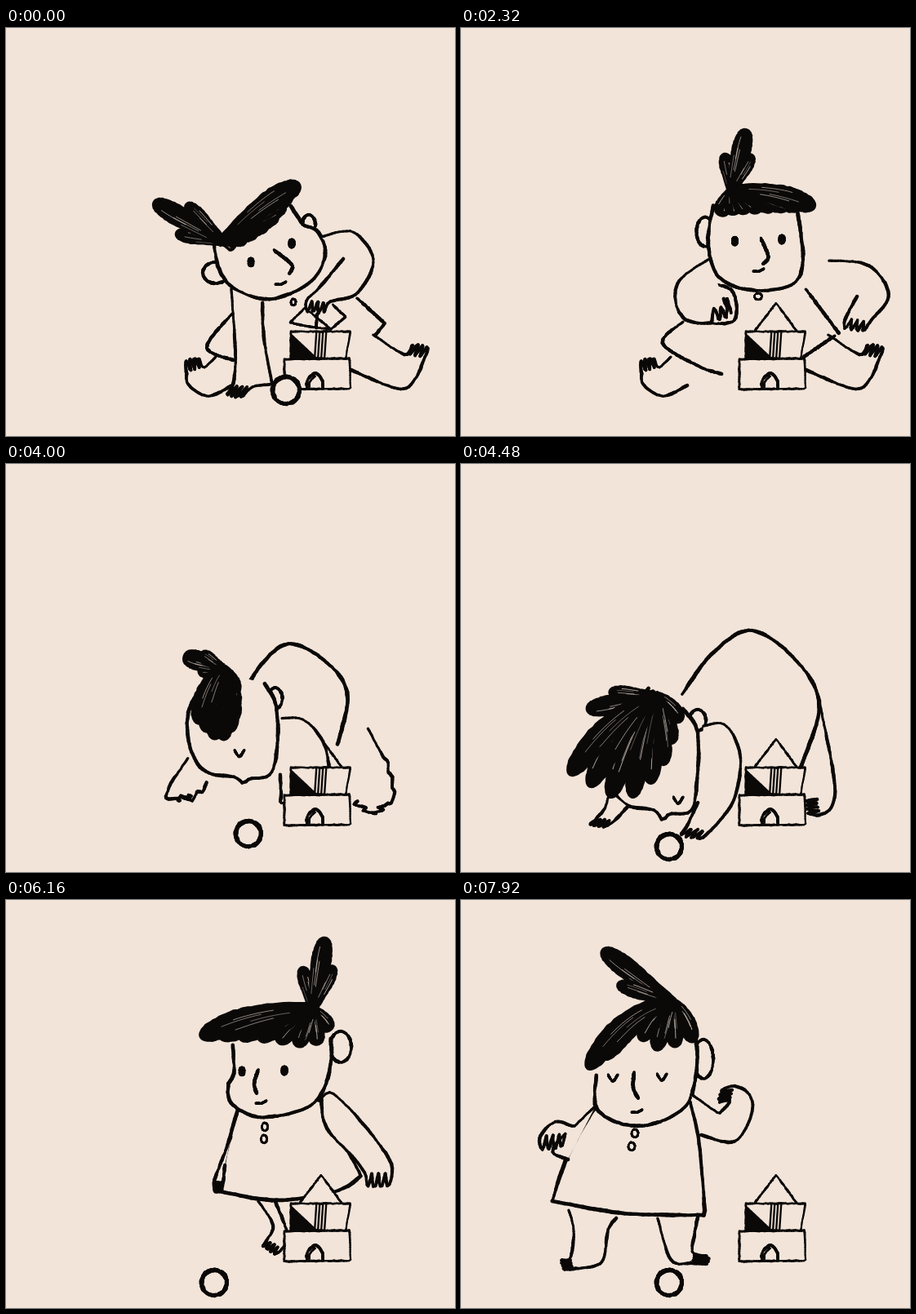
Animation, 550 px wide and 500 px high, one loop 8 s. Source, as an HTML page with a canvas:

```html
<!DOCTYPE html>
<html lang="en">
<head>
<meta charset="utf-8">
<title>Child with blocks</title>
<style>
html, body { margin: 0; width: 100%; height: 100%; overflow: hidden; background: #f2e4d9; }
canvas { display: block; width: 100vw; height: 100vh; }
</style>
</head>
<body>
<canvas id="stage" width="550" height="500"></canvas>
<script>
const ctx = document.getElementById('stage').getContext('2d');
const PAPER = '#f2e4d9', INK = '#0b0908', LOOP = 8000, STEP = 80, SAMPLES = 78;

const hash = n => { const s = Math.sin(n * 127.1) * 43758.5453; return s - Math.floor(s); };
const noise = x => {
  const i = Math.floor(x), f = x - i, u = f * f * (3 - 2 * f);
  return hash(i) * (1 - u) + hash(i + 1) * u;
};
const lerp = (a, b, k) => a + (b - a) * k;
const rad = deg => deg * Math.PI / 180;
const at = (x, y) => x.toFixed(1) + ',' + y.toFixed(1);

// Smooth curve through "x,y" points; "!" marks a corner. Evenly resampled.
function curve(text) {
  const pts = text.split(' ').map(s => {
    const [x, y] = s.split(',').map(parseFloat);
    return { x, y, sharp: s.endsWith('!') };
  });
  const n = pts.length, a = pts[0], z = pts[n - 1];
  const closed = n > 3 && a.x === z.x && a.y === z.y && !a.sharp;
  const slope = i => {
    if (pts[i].sharp) return [0, 0];
    const p = pts[i - 1] || (closed ? pts[n - 2] : pts[i]);
    const q = pts[i + 1] || (closed ? pts[1] : pts[i]);
    return [(q.x - p.x) / 2, (q.y - p.y) / 2];
  };
  const dense = [[a.x, a.y, 0]];
  for (let i = 0; i < n - 1; i++) {
    const p = pts[i], q = pts[i + 1], m = slope(i), w = slope(i + 1);
    for (let j = 1; j <= 10; j++) {
      const t = j / 10, t2 = t * t, t3 = t2 * t;
      const h = 2 * t3 - 3 * t2 + 1, g = t3 - 2 * t2 + t, e = t3 - t2;
      const x = h * p.x + g * m[0] + (1 - h) * q.x + e * w[0];
      const y = h * p.y + g * m[1] + (1 - h) * q.y + e * w[1];
      const last = dense[dense.length - 1];
      dense.push([x, y, last[2] + Math.hypot(x - last[0], y - last[1])]);
    }
  }
  const len = dense[dense.length - 1][2], out = [];
  for (let i = 0, j = 1; i < SAMPLES; i++) {
    const d = len * i / (SAMPLES - 1);
    while (j < dense.length - 1 && dense[j][2] < d) j++;
    const p = dense[j - 1], q = dense[j], k = Math.min(1, (d - p[2]) / (q[2] - p[2] || 1));
    out.push([lerp(p[0], q[0], k), lerp(p[1], q[1], k)]);
  }
  return out;
}

const ring = (x, y, rx, ry = rx) => Array.from({ length: 9 }, (_, i) =>
  at(x + rx * Math.cos(rad(i % 8 * 45)), y + ry * Math.sin(rad(i % 8 * 45)))).join(' ');
const dot = (x, y) => `${x},${y - 2.5} ${x},${y + 2.5}`;
const lid = (x, y) => `${x - 6},${y - 4} ${x},${y + 4} ${x + 6},${y - 4}`;
const lips = (x, y) => `${x - 6},${y + 1} ${x + 1},${y + 1} ${x + 7},${y - 2}`;

// Arm or leg: out along one side, four fingers or toes, back along the other
function limb(out, back, deg, len) {
  const [ax, ay] = out.split(' ').pop().split(',').map(parseFloat);
  const [bx, by] = back.split(' ')[0].split(',').map(parseFloat);
  const tips = [];
  for (let i = 0; i < 4; i++) {
    const k = (i + .5) / 4, l = len * (1 - .25 * Math.abs(k - .5));
    tips.push(at(lerp(ax, bx, k) + l * Math.cos(rad(deg)), lerp(ay, by, k) + l * Math.sin(rad(deg))));
    if (i < 3) tips.push(at(lerp(ax, bx, k + .125), lerp(ay, by, k + .125)) + '!');
  }
  return [out, ...tips, back].join(' ');
}

// Top tuft of three locks and a fringe whose tips lie along a curve.
// Each lock: root, bend, tip, half width
function hair(x, y, tx, ty, tips, { lift = .12, low = -.42, high = .28 } = {}) {
  const lock = (ex, ey, up, w) => {
    const d = Math.hypot(ex - x, ey - y);
    return [x, y, (x + ex) / 2, (y + ey) / 2 - d * up, ex, ey, w + d * .04];
  };
  const side = (turn, k) => {
    const a = Math.atan2(ty - y, tx - x) + turn, d = Math.hypot(tx - x, ty - y) * k;
    return lock(x + d * Math.cos(a), y + d * Math.sin(a), 0, 6);
  };
  const ends = curve(tips);
  return [side(low, .6), lock(tx, ty, 0, 8), side(high, .66),
    ...Array.from({ length: 8 }, (_, i) => lock(...ends[i * 11], lift, 8.5))];
}

const pose = parts => Object.fromEntries(Object.entries({ roof: '360,371! 386,337! 411,371', ...parts })
  .map(([name, v]) => [name, typeof v === 'string' ? curve(v) : v]));
function mix(p, q, k) {
  const out = {};
  for (const name of new Set([...Object.keys(p), ...Object.keys(q)])) {
    if (p[name] && q[name])
      out[name] = p[name].map((a, i) => a.map((v, j) => lerp(v, q[name][i][j], k)));
    else if ((k < .5 ? p : q)[name]) out[name] = p[name] || q[name];
  }
  return out;
}
function shift(p, dx, dy, only = /./) {
  const out = {};
  for (const name in p)
    out[name] = only.test(name) && !/roof|ball/.test(name)
      ? p[name].map(a => a.map((v, j) => j === 6 ? v : v + (j % 2 ? dy : dx))) : p[name];
  return out;
}
const drop = (p, re) => Object.fromEntries(Object.entries(p).filter(([n]) => !re.test(n)));

const sitting = {
  hemL: '272,360 247,386 290,414 319,424', hemR: '458,377 420,403',
  legL: limb('257,403 242,416', '221,421 224,438 248,451 277,438', -105, 14),
  legR: limb('450,376 488,400', '513,404 500,432 480,442 420,418', -62, 16),
  ball: ring(374, 424, 15.5)
};
const parked = ring(255, 469, 15.5);

const reach = pose({
  ...sitting,
  head: '254,250 260,293 282,321 325,332 372,312 391,278 382,250 364,242! 349,218',
  ear: ring(257, 300, 16, 13), ear2: ring(371, 241, 8, 12),
  eyeL: dot(300, 287), eyeR: dot(350, 264), nose: '328,272 350,290 347,301', mouth: lips(336, 313),
  k1: ring(352, 336, 3, 4),
  hemL: '277,350 246,391 278,407', hemR: '430,331 464,362! 452,377',
  armL: limb('276,320 281,400 278,437', '302,440 326,437! 316,380 314,337', 130, 19),
  armR: limb('386,256 425,250 450,285 430,325 396,336', '368,334 384,318 413,283', 100, 15),
  roof: '348,361! 366,343! 398,369', held: '348,361! 372,366 398,369! 416,354! 400,339', stick: '381,350 380,368',
  ball: ring(343, 444, 16.5),
  hair: hair(266, 262, 181, 213, '282,266 330,234 350,205 360,192', { low: -.35 })
});

const build = pose({
  ...sitting,
  head: '338,219 321,262 327,302 360,335 400,343 428,328 438,286 448,250',
  ear: ring(316, 252, 14, 18),
  eyeL: dot(373, 285), eyeR: dot(421, 298), nose: '400,294 398,305 402,312',
  armL: limb('322,282 278,306 276,350 322,362 362,340', '396,320 362,301 320,315', 95, 13),
  armR: limb('436,291 484,297 509,333 486,366', '456,362 470,335', 110, 14),
  fold: '432,328 466,350',
  hair: hair(376, 207, 391, 128, '353,240 382,240 425,250 459,254')
});

const smile = pose({
  ...sitting,
  head: '302,218 298,262 312,305 354,318 404,308 415,275 404,222',
  body: '325,300 335,262 378,262 392,300',
  ear: ring(295, 250, 10, 18), ear2: ring(407, 247, 6, 13),
  lidL: lid(326, 258), lidR: lid(387, 251), nose: '359,249 371,274 362,284', mouth: lips(364, 297),
  k1: ring(364, 329, 4.5, 4),
  legL: limb('260,394 262,406', '228,419 236,440 268,449 294,418', 65, 13),
  armL: limb('298,284 262,315 268,355 300,362! 298,344', '322,336', 80, 20),
  fist: '302,362 335,358 332,322 300,315 281,329',
  armR: limb('414,294 470,315 499,352', '473,352 420,318', 95, 22),
  fold: '420,318 462,380',
  hair: hair(320, 199, 339, 124, '308,228 332,226 378,217 427,212')
});

const bow = pose({
  body: '271,282 308,232 356,204 410,240 439,295 416,372',
  head: '230,275 184,330 186,396 206,419 236,424 247,436 256,429 280,426 288,400 290,330 272,300',
  ear2: ring(290, 314, 10, 13), lidL: lid(266, 412),
  armL: limb('182,402 176,422 166,434', '187,438 204,420', 145, 14),
  armR: limb('297,321 324,320 342,358 334,412 304,451', '276,445 290,415', 140, 16),
  legR: limb('440,296 457,385 455,418 440,430', '436,411', 180, 16),
  ball: parked,
  hair: hair(238, 284, 154, 301, '269,316 248,370 232,392 194,412 133,381', { lift: .2 })
});

const stand = pose({
  body: '262,357! 268,315 284,256! 320,240! 386,245! 435,338! 404,357 330,368 262,357',
  head: '278,178 279,212 272,228 277,250 310,266 360,258 386,238 398,200 398,170',
  ear2: ring(410, 180, 13, 19),
  eyeL: dot(289, 210), eyeR: dot(341, 209), nose: '309,208 304,225 307,237', mouth: lips(312, 248),
  k1: ring(317, 278, 3.5, 5), k2: ring(316, 293, 3.5, 5),
  armL: limb('276,290 260,330 255,346', '266,346 268,325', 92, 13),
  armR: limb('388,241 400,237 432,268 468,315 473,335', '440,336 425,315 392,278 386,240', 95, 18),
  legL: limb('309,369 327,398 320,416', '338,428 345,410 330,370', 135, 11),
  legR: limb('352,376 352,410', '385,430 400,410 380,376', 90, 2),
  ball: parked,
  hair: hair(376, 134, 391, 46, '397,160 382,177 358,180 312,172 238,168')
});

const wave = pose({
  body: '97,387! 99,340 103,262! 120,245! 205,232! 218,242 245,275 289,331! 200,375 97,387',
  head: '88,165 86,225 104,254 150,260 200,244 217,214 201,186 190,148',
  ear: ring(77, 213, 17, 16),
  eyeL: dot(115, 202), eyeR: dot(175, 187), nose: '147,188 166,214 159,224', mouth: lips(168, 239),
  k1: ring(167, 268, 5, 6), k2: ring(173, 287, 4.5, 6),
  armL: limb('101,262 78,320 73,368', '97,368 98,340 103,265', 90, 25),
  armR: limb('225,228 260,242 318,266', '322,291 295,290 247,277', -22, 22),
  legL: limb('136,385 140,410 136,437', '140,453 168,446 180,410 176,382', 172, 14),
  legR: limb('216,373 240,428 256,444 284,445', '284,432 274,408 260,357', 8, 21),
  ball: parked,
  hair: hair(95, 146, 82, 55, '90,176 108,164 136,154 199,132')
});

const look = pose({
  body: '112,369! 130,315 163,255! 200,245! 265,240! 281,248! 292,300 299,386! 200,384 112,369',
  head: '166,215 166,255 200,275 240,273 277,250 289,205 288,170',
  ear2: ring(297, 195, 12, 24),
  lidL: lid(186, 218), lidR: lid(246, 217), nose: '212,211 211,230 217,243', mouth: lips(215, 259),
  k1: ring(213, 286, 4, 5), k2: ring(209, 302, 4, 5),
  armL: limb('165,252 138,278! 115,272 97,290', '128,286! 112,308 131,318', 95, 18),
  armR: limb('282,238 316,262! 330,246', '334,228 353,238 356,262 335,296 294,288', 165, 18),
  legL: limb('132,380 138,405 134,438', '138,452 172,444 180,405 190,390', 172, 14),
  legR: limb('241,390 252,430 262,445 284,445', '284,432 286,410 290,388', 8, 20),
  ball: parked,
  hair: hair(259, 126, 173, 61, '285,174 234,184 205,158 172,198 155,207', { lift: .28, low: -.2, high: -.32 })
});

const FACE = /head|ear|eye|lid|nose|mouth|hair/, UPPER = /head|ear|eye|nose|mouth|hair|arm|body|k\d/;
const placed = { ...drop(shift(reach, 4, 3, /armR/), /held|stick/), roof: build.roof };
const rise = { ...mix(placed, build, .3), armR: build.armR, armL: placed.armL, ball: reach.ball };
const settle = shift(build, 0, -3, FACE);
const nudge = shift(settle, 2, 3, /armL/);
const ready = { ...drop(smile, /lid|body/), legL: build.legL, eyeL: curve(dot(326, 256)), eyeR: curve(dot(386, 250)) };
const lift = { ...mix(settle, ready, .8), armR: shift(build, 15, -6).armR };
const dip = shift(bow, -2, -5, /head|lid|hair|body|ear/);
const up = { ...shift(stand, 21, -7), hair: hair(397, 127, 412, 39, '418,153 402,170 379,173 333,165 302,161') };
const taller = shift(up, 0, -4, FACE);
const arrive = shift(wave, 2, 2, UPPER);

// [first change, last change, pose reached]
const MOVES = [
  [80, 240, placed], [400, 640, rise], [880, 1280, build], [1360, 1440, settle],
  [1600, 1600, nudge], [1680, 1680, settle], [1840, 1840, nudge], [1920, 1920, settle],
  [2080, 2320, lift], [2640, 2880, ready], [3520, 3520, smile], [3600, 4320, dip],
  [4400, 4480, bow], [4720, 5360, up], [5520, 5680, taller], [6000, 6160, stand],
  [6240, 6800, arrive], [6880, 6960, wave], [7680, 7920, look]
];
function poseAt(t) {
  let now = reach;
  for (const [from, to, next] of MOVES) {
    if (t < from) break;
    const k = ((t - from) / STEP + 1) / ((to - from) / STEP + 1);
    if (k < 1) return mix(now, next, k * k * (3 - 2 * k));
    now = next;
  }
  return now;
}

function trace(pts) {
  ctx.beginPath();
  pts.forEach(([x, y]) => ctx.lineTo(x, y));
}
function fill(pts, color) {
  trace(pts);
  ctx.fillStyle = color;
  ctx.fill();
}
// Brush line of uneven weight
function ink(pts, w) {
  ctx.strokeStyle = INK;
  const rough = i => (hash(i + w) - .5) * .6;
  for (let i = 1; i < pts.length; i++) {
    const p = pts[i - 1], q = pts[i];
    ctx.lineWidth = w * (.74 + .52 * noise(i * .3 + w * 9));
    ctx.beginPath();
    ctx.moveTo(p[0] + rough(i - 1), p[1] + rough(i + 30));
    ctx.lineTo(q[0] + rough(i), q[1] + rough(i + 31));
    ctx.stroke();
  }
}

function lock([x0, y0, cx, cy, x1, y1, w], seed) {
  const edge = (u, off) => {
    const v = 1 - u, dx = v * (cx - x0) + u * (x1 - cx), dy = v * (cy - y0) + u * (y1 - cy);
    const r = w * (.5 + .5 * Math.min(1, u * 1.5)) * Math.sqrt(1 - u ** 9) * off / (Math.hypot(dx, dy) || 1);
    return [v * v * x0 + 2 * u * v * cx + u * u * x1 - dy * r, v * v * y0 + 2 * u * v * cy + u * u * y1 + dx * r];
  };
  const side = [], back = [];
  for (let i = 0; i <= 30; i++) {
    const u = 1 - (1 - i / 30) ** 1.6, e = .95 + .1 * hash(i + seed * 31);
    side.push(edge(u, e));
    back.unshift(edge(u, -e));
  }
  fill(side.concat(back), INK);
  ctx.closePath();
  ctx.strokeStyle = INK;
  ctx.lineWidth = 2.5;
  ctx.stroke();
  ctx.strokeStyle = PAPER;
  ctx.lineWidth = 1;
  for (let j = 0; j < 4; j++) {
    const off = (hash(seed * 7 + j) - .5) * 1.5, from = .2 + .35 * hash(seed + j * 3), line = [];
    for (let i = 0; i <= 8; i++) line.push(edge(from + i / 8 * .35, off));
    ctx.globalAlpha = .3 + .55 * hash(j + seed * 5);
    trace(line);
    ctx.stroke();
  }
  ctx.globalAlpha = 1;
}

const BLOCKS = ['341,406! 421,405! 422,442! 341,443! 341,406', '349,372! 422,372! 416,405! 349,405! 349,372'].map(curve);
const WEDGE = curve('349,374! 381,404! 349,404! 349,374');
const DOOR = curve('369,442 369,432 379,423 387,431 388,442');
function blocks() {
  BLOCKS.forEach(b => { fill(b, PAPER); ink(b, 2.8); });
  fill(WEDGE, INK);
  for (let x = 380; x < 394; x += 4) ink([[x, 373], [x - 2, 404]], 2.1);
  ink(DOOR, 3.4);
  ink(DOOR.slice(6, 34).map(([x, y]) => [x + 3, y + 2]), 2.5);
}

const WIDTH = { eyeL: 6.5, eyeR: 7, lidL: 3, lidR: 3, mouth: 2.8, k1: 2.4, k2: 2.4, ball: 5, body: 4.4, head: 4.2, nose: 4, roof: 2.6, held: 3, stick: 3 };
const FILLED = /^(body|head|arm[LR]|fist|ball|leg[LR]|ear2?|roof)$/;
const UNDER = 'legL legR body hemL hemR fold k1 k2 ear ear2 head eyeL eyeR lidL lidR nose mouth'.split(' ');
const OVER = 'roof held stick fist armL armR'.split(' ');

function draw(t) {
  const p = poseAt(t), tucked = t >= 880 && t < 3840;
  const part = name => {
    if (!p[name]) return;
    if (FILLED.test(name)) fill(p[name], PAPER);
    ink(p[name], WIDTH[name] || 3.8);
  };
  ctx.fillStyle = PAPER;
  ctx.fillRect(0, 0, 550, 500);
  UNDER.forEach(part);
  OVER.forEach(part);
  if (tucked) part('ball');
  blocks();
  p.hair.forEach(lock);
  if (!tucked) part('ball');
}

ctx.lineCap = ctx.lineJoin = 'round';
const begin = performance.now();
let shown = -1;
function tick() {
  const t = Math.floor((performance.now() - begin) % LOOP / STEP) * STEP;
  if (t !== shown) draw(shown = t);
  requestAnimationFrame(tick);
}
tick();
</script>
</body>
</html>
```
